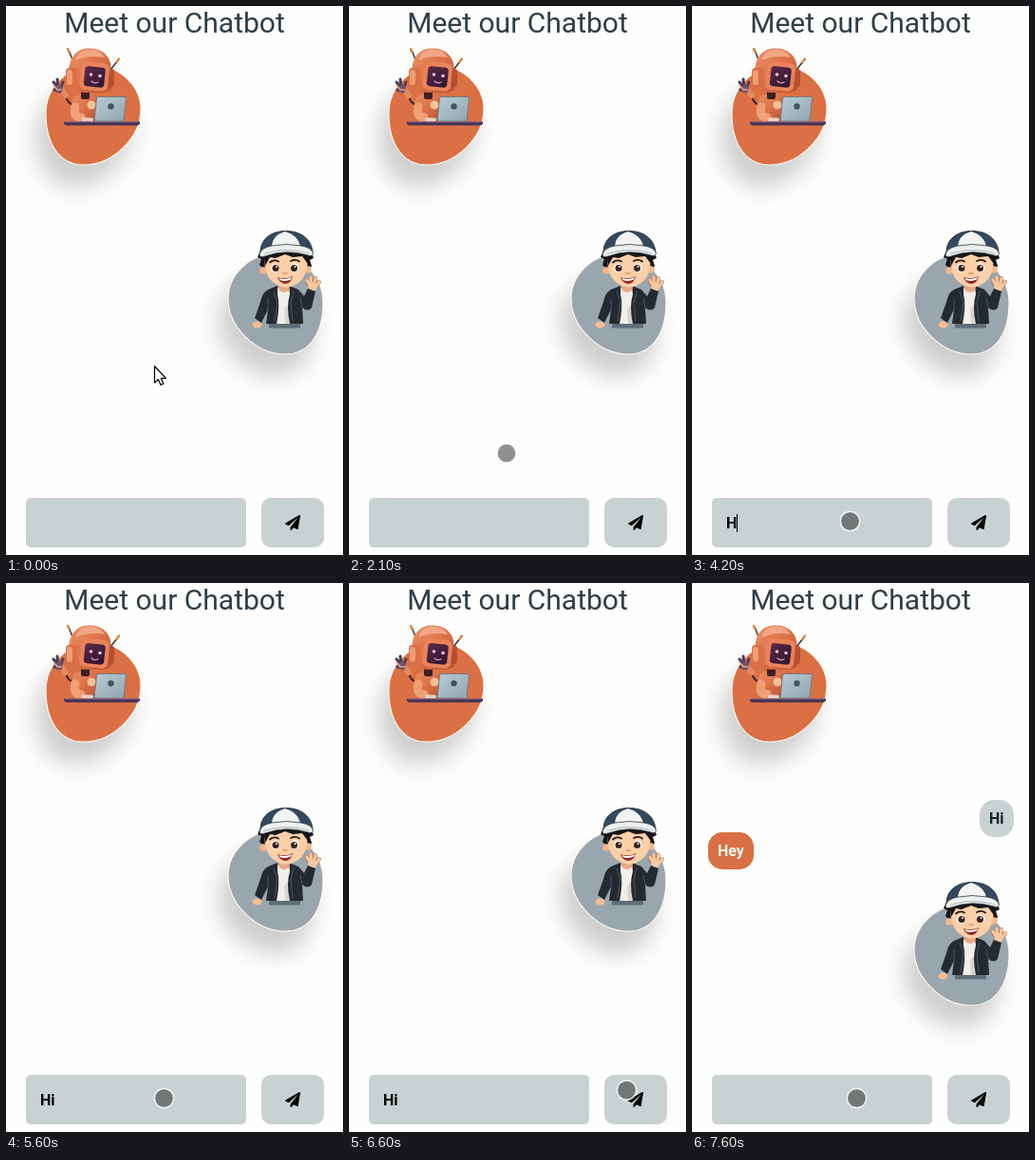
These frames come from a looping animation (355 by 577 pixels, 8 s). An HTML page:

```html
<!DOCTYPE html>
<html lang="en">
<head>
<meta charset="utf-8">
<title>Meet our Chatbot</title>
<style>
  html, body { margin: 0; width: 100%; height: 100%; overflow: hidden; background: #fefefd; }
  svg { display: block; width: 355px; height: 577px; }
  text { font: 700 16px Roboto, sans-serif; }
  .title { font-weight: 400; font-size: 30px; fill: #2f3e46; text-anchor: middle; }
  .panel { fill: #c9d2d3; }
  .blob { stroke: #fff8f2; stroke-width: 1.1; filter: drop-shadow(-10px 23px 12px rgba(0, 0, 0, .19)); }
  .line { fill: none; stroke-linecap: round; stroke-linejoin: round; }
</style>
</head>
<body>
<svg viewBox="0 0 355 577">
  <defs>
    <linearGradient id="shell" x1="0" y1="0" x2="1" y2="1">
      <stop offset="0" stop-color="#eb9268"/><stop offset=".5" stop-color="#dd7147"/><stop offset="1" stop-color="#b5502f"/>
    </linearGradient>
    <linearGradient id="screen" x1="0" y1="0" x2="1" y2="1">
      <stop offset="0" stop-color="#5c2a49"/><stop offset="1" stop-color="#2c1630"/>
    </linearGradient>
    <linearGradient id="lid" x1="0" y1="0" x2="1" y2="1">
      <stop offset="0" stop-color="#b9cbd3"/><stop offset="1" stop-color="#8fa6b1"/>
    </linearGradient>
  </defs>

  <text class="title" x="177.500" y="28">Meet our Chatbot</text>

  <g id="robot">
    <path class="blob" fill="#db7044" d="M142 108C142 84 120 63 94 63C64 63 42 85 42 113C42 147 58 167 82 167C112 167 142 139 142 108Z"/>
    <!-- antennas -->
    <path class="line" stroke="#3a2422" stroke-width="1.400" d="M72 62L66 46M110 67L118 57"/>
    <path class="line" stroke="#d98a4c" stroke-width="2.400" d="M65 45L66.500 48.500M116.500 59L119 55.500"/>
    <!-- raised arm -->
    <path class="line" stroke="#3b2632" stroke-width="2" d="M63 95Q65 103 72 104"/>
    <path class="line" stroke="#e58a60" stroke-width="6" d="M58 88L63 94"/>
    <path class="line" stroke="#4a3c58" stroke-width="3" d="M50 80L55 86L54 77M58 85L60 80M51 88L57 90"/>
    <circle cx="56" cy="87" r="4" fill="#6b5570"/>
    <path class="line" stroke="#e9a07e" stroke-width="1.500" d="M50 83L54 88L59 88"/>
    <!-- body -->
    <path fill="url(#shell)" d="M72 95Q86 89 97 95L96 121H71Q65 106 72 95Z"/>
    <rect x="79" y="89" width="9" height="9" rx="2" fill="#3a2027"/>
    <circle cx="90" cy="104" r="4.500" fill="#f3c09a"/>
    <path class="line" stroke="#f0a075" stroke-width="9" d="M73 106Q70 117 79 117"/>
    <!-- head -->
    <path fill="url(#shell)" d="M67 74C64 54 75 45 86 44.500C99 43.500 108 51 110 60L112 84Q111 91 100 91H82Q69 90 67 74Z"/>
    <path fill="#f2a685" d="M73 57Q76 46 87 45.500Q99 45 104 54Q88 51 73 57Z"/>
    <rect x="63" y="65" width="12" height="20" rx="4" fill="#d86f45"/>
    <rect x="64" y="67" width="6" height="16" rx="3" fill="#ef9d72"/>
    <rect x="107" y="66" width="7" height="19" rx="3" fill="#b8502f"/>
    <rect x="78" y="59" width="30" height="30" rx="6" fill="#e9835b" transform="rotate(6 93 75)"/>
    <rect x="82.500" y="64" width="21.500" height="21" rx="3.500" fill="url(#screen)" transform="rotate(6 93 75)"/>
    <g fill="#f3bcd8"><circle cx="89.500" cy="72" r="1.800"/><circle cx="99" cy="73.500" r="1.800"/></g>
    <path class="line" stroke="#d992b8" stroke-width="1.300" d="M90 79Q93 82 97 80"/>
    <!-- laptop and desk -->
    <path fill="url(#lid)" stroke="#61747e" stroke-width=".8" d="M97 95.500H125Q127 95.500 126.500 97L124 121H93L95.500 97Q95.700 95.500 97 95.500Z"/>
    <circle cx="110.500" cy="105.500" r="3.200" fill="#46545d"/>
    <path class="line" stroke="#e9d2c6" stroke-width="4" d="M82 119.500H90"/>
    <path fill="#413456" d="M61 121.500H141V123.500L139 125.500H63L61 123.500Z"/>
    <path class="line" stroke="#a76f88" stroke-width="1" d="M62 121.800H140"/>
  </g>

  <g id="user">
    <path class="blob" fill="#9aa6ae" d="M234 307C234 283 256 261 282 261C312 261 334 284 334 312C334 346 318 366 294 366C264 366 234 338 234 307Z"/>
    <!-- hands -->
    <ellipse cx="264.500" cy="335" rx="5" ry="3.500" fill="#f4bd94"/>
    <path class="line" stroke="#b97a58" stroke-width="4" d="M318 292L317 288M322 290L321 285M325 291L326 286M327 294L330 290"/>
    <path class="line" stroke="#f8c8a0" stroke-width="3" d="M322 297L317 288M322 296L321 285M324 296L326 286M325 297L330 290"/>
    <circle cx="323" cy="295" r="4.500" fill="#f8c8a0"/>
    <!-- clothes -->
    <path fill="#5f6e79" d="M277 334H310V338.500H277Z"/>
    <path fill="#f2efe9" d="M285 297H300L299 334H285Z"/>
    <path fill="#d9d5ce" d="M293 318L299 312V334H294Z"/>
    <path fill="#242a32" d="M286 294L276 298Q270 301 268 311L262 328L269 333L276 319L274 334H285Q289 314 286 303Z"/>
    <path fill="#242a32" d="M298 294L308 298L314 305L318 297L326 300L322 317Q318 322 312 317L313 334H299Q295 316 299 303Z"/>
    <path class="line" stroke="#4b5662" stroke-width="1" d="M276 319L276 308M282 300L286 311L283 331M303 300L300 312L302 331M312 317L310 307"/>
    <path fill="#e9a982" d="M287 290H300L298 299Q293 303 288 299Z"/>
    <!-- head -->
    <path fill="#171517" d="M268 257L265 264L269 266L267 272L270 275L269 280L277 277V257ZM321 257L324 265L320 267L322 273L319 279L313 276V257Z"/>
    <circle cx="271" cy="278" r="3.800" fill="#f2b78d"/>
    <circle cx="318" cy="277" r="3.800" fill="#f2b78d"/>
    <path fill="#fbcfa8" d="M273 258H317Q320 281 309 290Q295 301 281 290Q270 281 273 258Z"/>
    <path fill="#171517" d="M271 258H319L318 271L312 263L302 264L294 261L284 265L278 264L273 273Z"/>
    <path class="line" stroke="#24191a" stroke-width="1.800" d="M278 269.500Q282 266 287 268.500M300 268Q305 265.500 309 268.500"/>
    <g fill="#fff"><ellipse cx="283.500" cy="275.500" rx="4.300" ry="4.600"/><ellipse cx="304" cy="275" rx="4.300" ry="4.600"/></g>
    <g fill="#3a2018"><circle cx="284" cy="275.500" r="3.500"/><circle cx="303.500" cy="275.500" r="3.500"/></g>
    <g fill="#fff"><circle cx="285" cy="274" r="1"/><circle cx="304.500" cy="274" r="1"/></g>
    <path class="line" stroke="#d68e67" stroke-width="1.300" d="M292 280.500Q294 282 296 280.500"/>
    <path fill="#8e2926" d="M286 285Q294 288 302 284Q300 292 294 292Q288 291 286 285Z"/>
    <path fill="#fff" d="M287.500 286Q294 288.500 301 285L300 287.500Q294 290 288.500 288Z"/>
    <!-- cap -->
    <path fill="#34495e" stroke="#1e2732" stroke-width=".8" d="M268 259C268 245 279 236.500 295 236.500C311 236.500 322 245 323 259Q295 246 268 259Z"/>
    <path fill="#f2f4f4" d="M280 254Q280 241 294 237Q308 241 310 253Q295 249 280 254Z"/>
    <path fill="#eef0f0" stroke="#32363c" stroke-width=".8" d="M267 261Q269 254 280 252Q295 249 311 252Q322 254 323.500 260Q323 264 318 262Q295 255 273 263Q267 265 267 261Z"/>
    <path class="line" stroke="#bac3c8" stroke-width="1.200" d="M272 260.500Q295 253 319 260"/>
  </g>

  <g id="chat">
    <rect class="panel" x="303" y="228" width="36" height="39" rx="15"/>
    <text x="313" y="253" fill="#17232b">Hi</text>
    <rect x="17" y="262" width="48" height="39" rx="15" fill="#d97045"/>
    <text x="27" y="287" fill="#fff9f3">Hey</text>
  </g>

  <rect class="panel" x="21" y="517" width="232" height="52" rx="5"/>
  <text id="entry" x="36" y="549"></text>
  <rect id="caret" y="534" width="1" height="19"/>
  <rect class="panel" x="269" y="517" width="66" height="52" rx="10"/>
  <path transform="translate(294 535)" d="M14.900 .1L.4 8.500C-.2 8.800-.1 9.600 .5 9.800L3.800 11.200L12.800 3.300C12.900 3.100 13.200 3.400 13 3.500L5.500 12.700V15.200C5.500 16 6.400 16.300 6.800 15.700L8.800 13.300L12.700 14.900C13.100 15.100 13.600 14.900 13.700 14.400L16 .9C16.100 .2 15.400-.2 14.900 .1Z"/>

  <path id="arrow" fill="#fff" stroke="#000" stroke-width="1.200" stroke-linejoin="round" d="M156.500 378.500V396L160.400 392.400L163 398.300L165.900 397L163.300 391.300H168.500Z"/>
  <g id="touch">
    <circle r="9.500" fill="#000" fill-opacity=".43"/>
    <circle r="10.200" fill="none" stroke="#fff" stroke-opacity=".7" stroke-width="1.500"/>
  </g>
</svg>
<script>
  const LOOP = 8000;
  const SENT = 6900;
  const part = id => document.getElementById(id);

  // [time, x, y] of the touch point
  const touchSteps = [
    [100, 157.5, 380.5], [1700, 155.5, 380.5],
    [1900, 157, 392], [2000, 161, 424], [2100, 166, 470], [2200, 169.5, 502.5],
    [2400, 171, 523], [2500, 169.5, 537], [2600, 167.5, 541.5], [2900, 166.5, 541.5],
    [6200, 176, 546], [6300, 206, 553], [6400, 248, 551], [6500, 281, 538], [6600, 292.5, 533],
    [7200, 268, 549], [7300, 219.5, 558], [7500, 186, 547], [7600, 173.5, 541.5]
  ];

  // [time, typed text]
  const typing = [[0, ""], [4200, "H"], [5100, "Hi"], [SENT, ""]];

  // [time, caret x], null while hidden
  const caretSteps = [
    [0, null], [2800, 36], [3300, null], [3800, 36], [4200, 47],
    [4700, null], [5100, 52], [5600, null], [6100, 52], [6600, null]
  ];

  const at = (steps, t) => steps.findLast(step => step[0] <= t);
  const show = (id, on) => { part(id).style.display = on ? "" : "none"; };

  function draw(t) {
    const point = at(touchSteps, t);
    show("arrow", !point);
    show("touch", point);
    if (point) part("touch").setAttribute("transform", `translate(${point[1]} ${point[2]})`);

    part("entry").textContent = at(typing, t)[1];

    const x = at(caretSteps, t)[1];
    show("caret", x !== null);
    if (x !== null) part("caret").setAttribute("x", x);

    const sent = t >= SENT;
    show("chat", sent);
    part("user").setAttribute("transform", `translate(0 ${sent ? 78 : 0})`);
  }

  const start = performance.now();
  function tick() {
    draw((performance.now() - start) % LOOP);
    requestAnimationFrame(tick);
  }
  tick();
</script>
</body>
</html>
```
